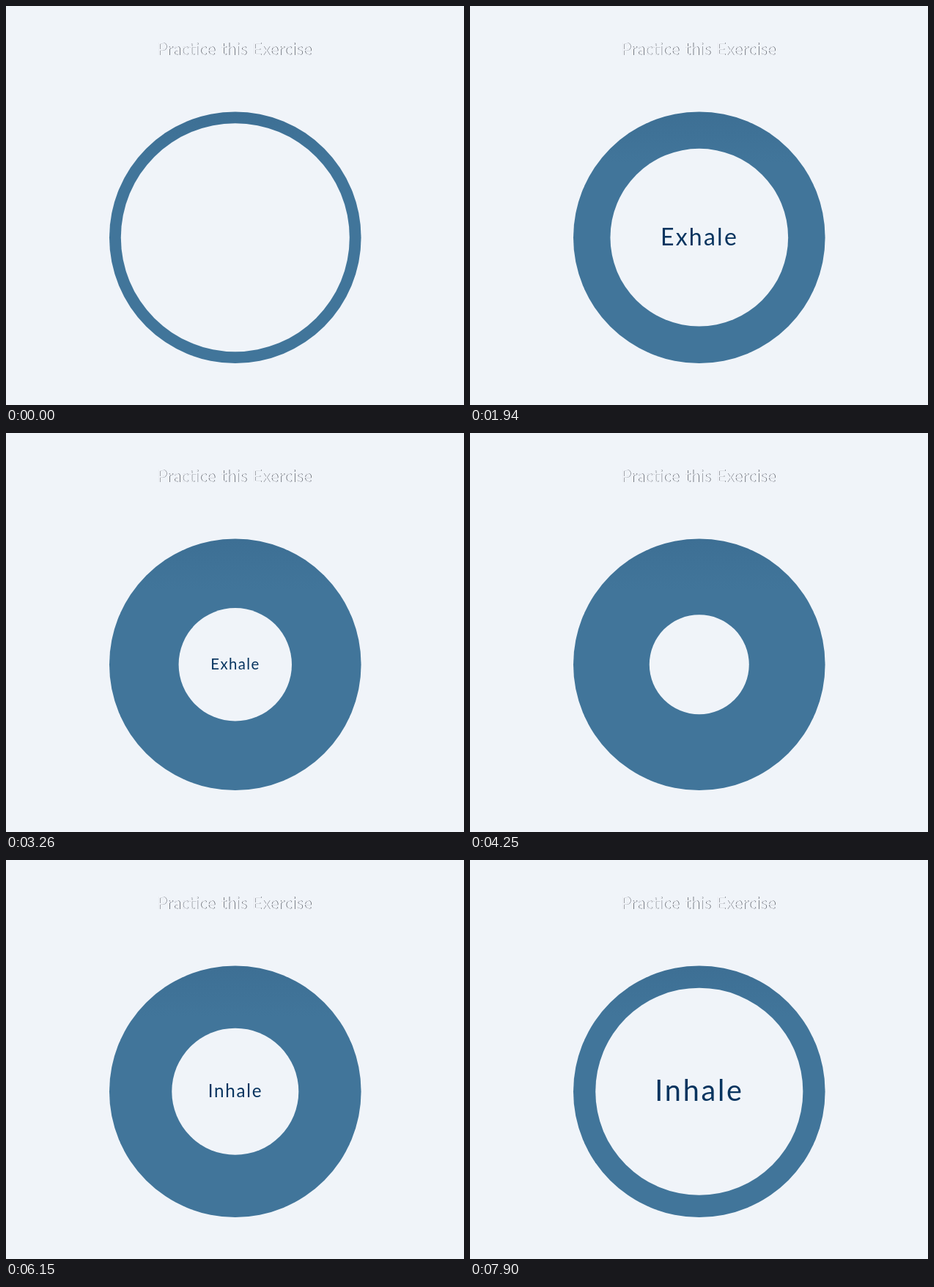
Write an HTML page that moves like this. It is 625 px wide and 545 px high and loops after 8 s.

```html
<!DOCTYPE html>
<html lang="en">
<head>
<meta charset="utf-8">
<title>Breathing exercise</title>
<style>
  html, body { margin: 0; width: 100%; height: 100%; overflow: hidden; background: #f0f4f9; }
  svg { display: block; width: 625px; height: 545px; }
  text { font-family: Lato, sans-serif; text-anchor: middle; }
  .title { font-size: 22.5px; word-spacing: 1.6px; }
  #word { fill: #07345f; letter-spacing: .07em; }
</style>
</head>
<body>
<svg viewBox="0 0 625 545">
  <defs>
    <linearGradient id="blue" x2="0" y2="1">
      <stop offset="0" stop-color="#3d6f94"/>
      <stop offset=".2" stop-color="#41759a"/>
    </linearGradient>
  </defs>
  <text class="title" x="312.4" y="67.2" fill="#50555e">Practice this Exercise</text>
  <text class="title" x="311.7" y="66.8" fill="#f4f7fc">Practice this Exercise</text>
  <circle cx="312.8" cy="316.2" r="171.8" fill="url(#blue)"/>
  <circle id="hole" cx="312.8" cy="316.2" fill="#f0f4f9"/>
  <text id="word" x="313"></text>
</svg>
<script>
const LOOP = 8000, WIDE = 156, NARROW = 68;
const breaths = [
  { label: 'Exhale', start: 225, length: 3920, from: WIDE, to: NARROW, size: .264 },
  { label: 'Inhale', start: 4766, length: 4360, from: NARROW, to: WIDE, size: .28 }
];
const hole = document.getElementById('hole');
const word = document.getElementById('word');
const clamp = v => Math.min(1, Math.max(0, v));

// Same curve as CSS ease-in-out, solved by bisection.
function easeInOut(x) {
  let lo = 0, hi = 1;
  for (let i = 0; i < 20; i++) {
    const s = (lo + hi) / 2;
    const at = 3 * s * (1 - s) * (.42 * (1 - s) + .58 * s) + s ** 3;
    if (at < x) lo = s; else hi = s;
  }
  return lo * lo * (3 - 2 * lo);
}

function draw(t) {
  const breath = breaths[t < 4400 ? 0 : 1];
  const elapsed = t - breath.start;
  const progress = easeInOut(clamp(elapsed / breath.length));
  const r = breath.from + (breath.to - breath.from) * progress;
  hole.setAttribute('r', r);
  word.textContent = breath.label;
  word.setAttribute('y', 316 + .094 * r);
  word.style.fontSize = r * breath.size + 'px';
  word.style.opacity = Math.min(clamp(elapsed / 400), clamp((breath.length - elapsed) / 600));
}

function frame() {
  draw(performance.now() % LOOP);
  requestAnimationFrame(frame);
}
frame();
</script>
</body>
</html>
```
